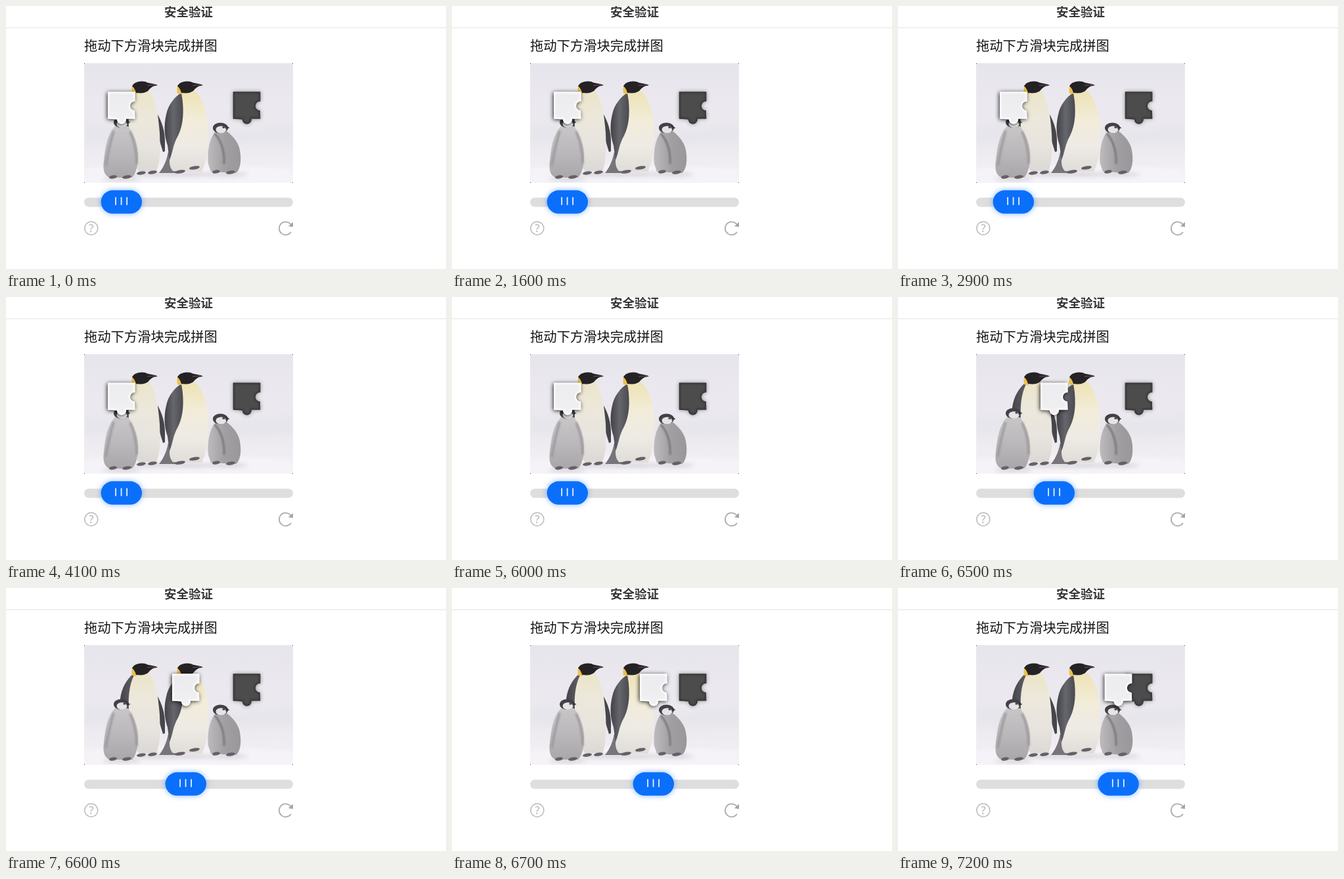
Recreate the animation shown at these times as an HTML page with a canvas. Size 670 by 400 pixels, loop 8000 ms.

```html
<!DOCTYPE html>
<html lang="zh-CN">
<head>
<meta charset="utf-8">
<style>
  html, body { margin: 0; width: 100%; height: 100%; overflow: hidden; background: #fff; }
  canvas { display: block; width: 670px; height: 400px; }
</style>
</head>
<body>
<canvas id="stage" width="670" height="400"></canvas>
<script>
const W = 670, H = 400, LOOP = 8000;
const FONT = '"Noto Sans CJK SC", "Noto Sans CJK JP", "Noto Sans CJK", sans-serif';
const PHOTO = { x: 119, y: 87, w: 318, h: 182 };
const DRAG = { start: 6400, step: 100, offsets: [27, 62, 98, 131, 152, 159.7] };
const ctx = document.getElementById('stage').getContext('2d');

function gradient(c, x0, y0, x1, y1, ...colors) {
  const g = c.createLinearGradient(x0, y0, x1, y1);
  colors.forEach((color, i) => g.addColorStop(i / (colors.length - 1), color));
  return g;
}

function fillPath(c, path, fill) {
  c.fillStyle = fill;
  c.fill(new Path2D(path));
}

function ellipse(c, x, y, rx, ry, fill, tilt = 0) {
  c.fillStyle = fill;
  c.beginPath();
  c.ellipse(x, y, rx, ry, tilt, 0, Math.PI * 2);
  c.fill();
}

function line(c, path, color, width) {
  c.strokeStyle = color;
  c.lineWidth = width;
  c.stroke(new Path2D(path));
}

function pill(c, x, y, w, h, fill) {
  c.fillStyle = fill;
  c.beginPath();
  c.roundRect(x, y, w, h, h / 2);
  c.fill();
}

function adultHead(c, dx) {
  c.save();
  c.translate(dx, 0);
  fillPath(c, 'M192 122 C198 123 200 129 199 134 L192 133 Q191 128 192 122Z', '#eec04a');
  fillPath(c, 'M192 122 C194 116 204 113 212 115 C219 119 227 117 231 121 C225 121 222 123 218 127 C214 133 204 133 198 132 C197 128 195 124 192 122Z', '#252225');
  line(c, 'M215 121 Q222 120 227 120', '#8a6256', .8);
  c.restore();
}

function adults(c) {
  fillPath(c, 'M193 131 C184 139 176 152 174 168 L175 190 L190 225 L195 195 L198 140Z',
    gradient(c, 173, 0, 196, 0, '#44444a', '#606066'));
  fillPath(c, 'M231 165 C237 176 242 190 242 205 L242 221 L239 222 L233 202Z', '#46454a');
  fillPath(c, 'M196 131 C187 147 185 170 188 195 C192 222 195 243 202 251 L229 251 C235 238 235 215 234 193 C232 162 226 142 219 130Z',
    gradient(c, 0, 131, 0, 251, '#ece5c9', '#ece8dc', '#e8e4df', '#dcd8d5'));
  adultHead(c, 0);

  fillPath(c, 'M247 222 C244 239 237 249 233 254 L258 254 L258 235Z', '#77747a');
  fillPath(c, 'M266 132 C262 160 260 185 253 215 C248 232 247 243 254 251 L298 252 C306 237 309 210 308 185 C306 160 300 142 289 130Z',
    gradient(c, 0, 131, 0, 252, '#eee3b5', '#f2ecd8', '#efebe5', '#e0dcd8'));
  fillPath(c, 'M267 132 C257 138 247 150 244 165 C240 182 241 197 246 212 L249 234 C253 226 254 214 259 203 C269 186 271 168 269 145Z',
    gradient(c, 241, 0, 269, 0, '#404046', '#66666d', '#4b4b51'));
  adultHead(c, 69);
}

function babyHead(c, x, y) {
  ellipse(c, x, y, 11.5, 8, '#434147');
  ellipse(c, x + 1, y + 2.5, 8, 5.5, '#e6e3e5');
  ellipse(c, x + 5, y - 1, 2.2, 1.6, '#4c494f');
  fillPath(c, `M${x + 8} ${y - 4} L${x + 14} ${y} L${x + 8} ${y + 2}Z`, '#3a383e');
}

function babies(c) {
  fillPath(c, 'M166 183 C154 195 151 215 149 235 C147 250 150 257 157 261 L192 261 C199 254 203 236 200 216 C197 200 191 190 186 183Z',
    gradient(c, 0, 183, 0, 262, '#c9c6c8', '#bbb8bb', '#a9a6a9'));
  c.filter = 'blur(1.5px)';
  line(c, 'M164 190 Q157 213 152 243', '#98959a', 3);
  line(c, 'M189 191 Q199 213 199 240', '#98959a', 3);
  c.filter = 'blur(.6px)';
  babyHead(c, 175.5, 177);

  fillPath(c, 'M318 192 C309 203 306 225 308 240 L312 252 L350 254 C358 248 359 230 355 215 C351 203 343 196 337 191Z',
    gradient(c, 308, 0, 358, 0, '#bdbabc', '#a29fa2', '#9a979b'));
  c.filter = 'blur(1px)';
  line(c, 'M318 194 C329 206 333 224 332 240', '#7c797e', 3);
  c.filter = 'blur(.6px)';
  babyHead(c, 326.5, 185.5);
}

function feet(c) {
  [[206, 254, 7], [223, 253, 7], [265, 252, 8], [287, 246, 8], [163, 260, 6],
   [184, 260, 7], [320, 252, 6], [342, 253, 7]].forEach(([x, y, w]) =>
    ellipse(c, x, y, w, 2.6, '#656067', -.15));
}

function makePhoto() {
  const canvas = document.createElement('canvas');
  canvas.width = W;
  canvas.height = H;
  const c = canvas.getContext('2d');
  c.beginPath();
  c.rect(PHOTO.x, PHOTO.y, PHOTO.w, PHOTO.h);
  c.clip();
  c.fillStyle = gradient(c, 0, 87, 0, 269, '#e7e5ec', '#ebe9ef', '#ebe9ee', '#f4f2f6');
  c.fillRect(PHOTO.x, PHOTO.y, PHOTO.w, PHOTO.h);
  c.filter = 'blur(3px)';
  fillPath(c, 'M119 183 Q180 178 250 187 T437 180 L437 207 Q330 214 119 207Z', '#e7e6ec');
  fillPath(c, 'M119 247 Q250 238 437 248 L437 274 L119 274Z', '#f5f3f7');
  [[227, 256, 36], [281, 256, 35], [338, 256, 30], [176, 263, 28]].forEach(([x, y, w]) =>
    ellipse(c, x, y, w, 3, '#d5d3d9'));
  c.filter = 'blur(.6px)';
  adults(c);
  babies(c);
  feet(c);
  c.filter = 'none';
  c.fillStyle = '#444';
  for (const x of [PHOTO.x, PHOTO.x + PHOTO.w - 1])
    for (const y of [PHOTO.y, PHOTO.y + PHOTO.h - 1]) c.fillRect(x, y, 1, 1);
  return canvas;
}

function puzzlePath(x, y) {
  const path = new Path2D();
  path.moveTo(x, y);
  path.lineTo(x + 41.5, y);
  path.lineTo(x + 41.5, y + 15);
  path.arc(x + 41, y + 21.5, 7, -Math.PI / 2, Math.PI / 2, true);
  path.lineTo(x + 41.5, y + 41);
  path.lineTo(x + 28, y + 41);
  path.arc(x + 21, y + 42, 7, 0, Math.PI);
  path.lineTo(x, y + 41);
  path.closePath();
  return path;
}

function puzzle(x, y, fill, edge, shadow, drop) {
  const path = puzzlePath(x, y);
  ctx.save();
  ctx.shadowColor = shadow;
  ctx.shadowBlur = 6;
  ctx.shadowOffsetX = -drop;
  ctx.shadowOffsetY = drop;
  ctx.fillStyle = fill;
  ctx.fill(path);
  ctx.restore();
  ctx.save();
  ctx.clip(path);
  ctx.filter = 'blur(1.5px)';
  ctx.strokeStyle = edge;
  ctx.lineWidth = 4;
  ctx.stroke(path);
  ctx.restore();
}

function slider(x) {
  ctx.save();
  ctx.shadowColor = 'rgba(11,108,255,.5)';
  ctx.shadowBlur = 8;
  pill(ctx, x, 280.3, 62.4, 35.5, '#0a6ffa');
  ctx.restore();
  for (const dx of [22.5, 31, 39.5]) line(ctx, `M${x + dx} 290.7 V302.7`, '#e6f0ff', 1.8);
}

function icons() {
  ctx.strokeStyle = '#bcbcbc';
  ctx.lineWidth = 1.5;
  ctx.beginPath();
  ctx.arc(129.8, 338, 10, 0, Math.PI * 2);
  ctx.stroke();
  ctx.fillStyle = '#b0b0b0';
  ctx.font = '17px "Open Sans", sans-serif';
  ctx.textAlign = 'center';
  ctx.fillText('?', 129.8, 344.3);
  ctx.textAlign = 'left';

  ctx.strokeStyle = '#adadad';
  ctx.lineWidth = 1.8;
  ctx.beginPath();
  ctx.arc(425.8, 338.2, 9.9, .6, Math.PI * 2 - .6);
  ctx.stroke();
  fillPath(ctx, 'M437 328.5 L437 336 L430 335Z', '#a3a3a3');
}

function text(value, x, y, size, weight, color) {
  ctx.font = `${weight} ${size}px ${FONT}`;
  ctx.fillStyle = color;
  ctx.fillText(value, x, y);
}

function dragOffset(t) {
  if (t < DRAG.start) return 0;
  const step = Math.floor((t - DRAG.start) / DRAG.step);
  return DRAG.offsets[Math.min(step, DRAG.offsets.length - 1)];
}

const photo = makePhoto();

function draw(t) {
  const dx = dragOffset(t);
  ctx.fillStyle = '#fff';
  ctx.fillRect(0, 0, W, H);
  text('安全验证', 241, 15.5, 18.5, 700, '#363636');
  ctx.fillStyle = '#e1e1e1';
  ctx.fillRect(0, 32.5, W, 1);
  text('拖动下方滑块完成拼图', 119, 67.5, 20.3, 400, '#151515');

  ctx.drawImage(photo, 0, 0);
  puzzle(345.8, 130.5, '#4c4c4d', '#363638', 'rgba(0,0,0,.4)', 0);
  puzzle(155 + dx, 130.5, gradient(ctx, 0, 130, 0, 179, '#ecebef', '#f0f0f2'), '#fff', 'rgba(0,0,0,.85)', 1);

  pill(ctx, 119, 291.5, 318, 14, '#dedede');
  slider(144.6 + dx);
  icons();
}

function frame(now) {
  draw(now % LOOP);
  requestAnimationFrame(frame);
}
draw(0);
requestAnimationFrame(frame);
</script>
</body>
</html>
```
